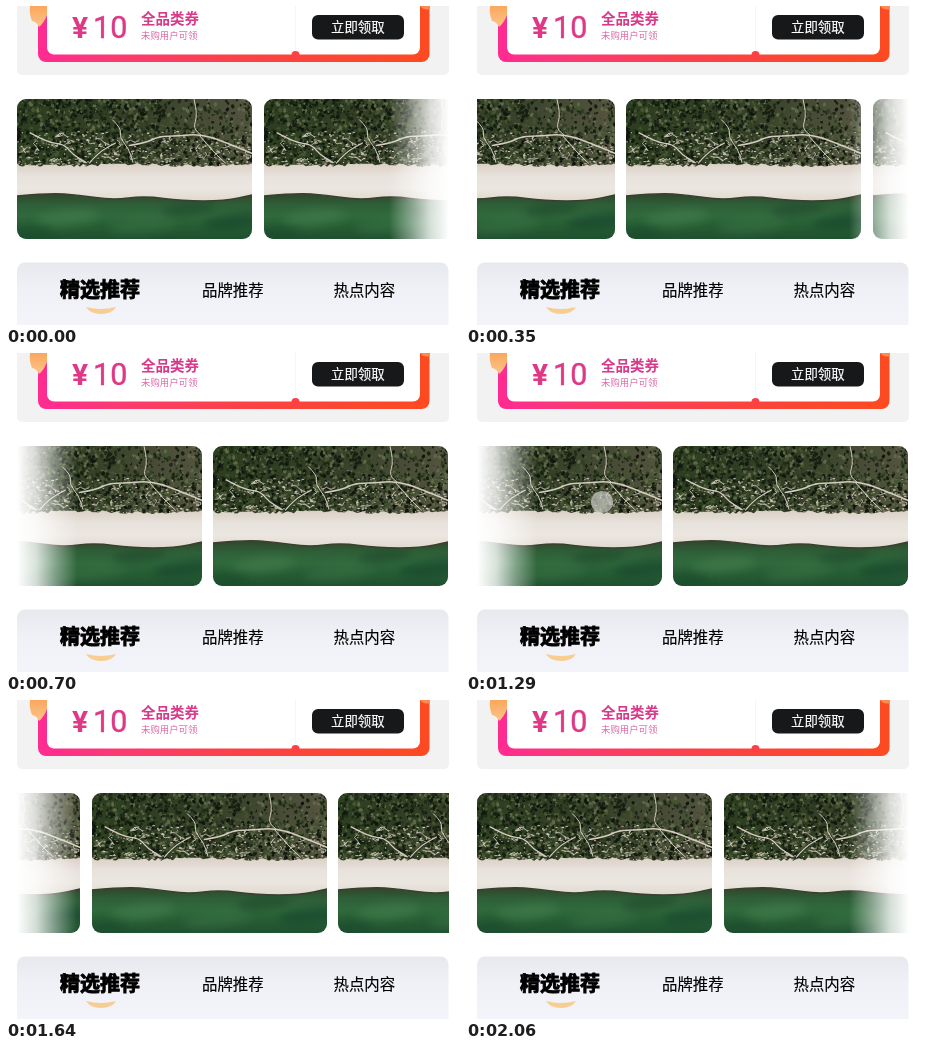
Recreate the animation shown at these times as an HTML page with a canvas. Size 454 by 319 pixels, loop 2.13 s.

```html
<!DOCTYPE html>
<html lang="zh-CN">
<head>
<meta charset="utf-8">
<style>
html, body { margin: 0; width: 100%; height: 100%; overflow: hidden; background: #fff; }
svg, .strip, .card, .fade { position: absolute; }
svg { left: 0; top: 0; }
text { font-family: "Noto Sans CJK SC", "Noto Sans CJK", sans-serif; }
.price { font-family: Roboto, sans-serif; }
.strip { left: 11px; top: 93px; width: 432px; height: 140px; overflow: hidden; }
.card { top: 0; left: 0; width: 235px; height: 140px; border-radius: 9px; }
.fade { top: 0; width: 60px; height: 140px; }
#left { left: 0; background: linear-gradient(90deg, #fff, #fffc 32%, #fff6 65%, #fff0); }
#right { right: 0; background: linear-gradient(270deg, #fff, #fffc 32%, #fff6 65%, #fff0); }
#touch { position: absolute; left: 114px; top: 45px; width: 22px; height: 22px; border-radius: 50%; background: rgba(205, 207, 200, .7); }
</style>
</head>
<body>
<svg width="454" height="319" viewBox="0 0 454 319">
  <defs>
    <linearGradient id="frame">
      <stop offset="0" stop-color="#ff2b92"/>
      <stop offset=".2" stop-color="#fb3a72"/>
      <stop offset=".5" stop-color="#fb4148"/>
      <stop offset="1" stop-color="#fd4a20"/>
    </linearGradient>
    <linearGradient id="peach" x2="0" y2="1">
      <stop offset="0" stop-color="#fba75c"/>
      <stop offset="1" stop-color="#fbc48c"/>
    </linearGradient>
    <linearGradient id="panel" x2="0" y2="1">
      <stop offset="0" stop-color="#e8e9ee"/>
      <stop offset=".35" stop-color="#f0f1f6"/>
      <stop offset="1" stop-color="#f5f6fb"/>
    </linearGradient>
  </defs>
  <rect x="11" y="-20" width="432" height="89" rx="5" fill="#f2f2f2"/>
  <rect x="32" y="-20" width="391.500" height="76" rx="8" fill="url(#frame)"/>
  <path d="M24 0H41V9Q38 17 33 21Q31 16 26 15Q23 8 24 0Z" fill="url(#peach)"/>
  <path d="M414 0H424V3Q418 5 414 0Z" fill="#ff8a4d"/>
  <rect x="41" y="-20" width="373" height="68.500" rx="7" fill="#fff"/>
  <circle cx="289.500" cy="49" r="4" fill="#fb4146"/>
  <path d="M289.500 0V44" stroke="#f9f3f6"/>
  <g fill="#df3886">
    <text class="price" x="66" y="31.500" font-size="30" font-weight="600">¥</text>
    <text class="price" x="87" y="31.500" font-size="30.500" font-weight="400" stroke="#df3886" stroke-width=".4">10</text>
    <text x="135" y="18" font-size="14.500" font-weight="700" fill="#d83a8a">全品类券</text>
    <text x="135" y="33" font-size="9.400" fill="#dd68a6">未购用户可领</text>
  </g>
  <rect x="306" y="9" width="92" height="24.500" rx="6" fill="#17181a"/>
  <text x="325" y="26" font-size="13.400" font-weight="500" fill="#fff" stroke="#fff" stroke-width=".2">立即领取</text>
  <rect x="11" y="256.500" width="431.500" height="80" rx="8" fill="url(#panel)"/>
  <path d="M80 301Q95 305 110 301Q106 308 95 308Q84 308 80 301Z" fill="#f7cd92"/>
  <g fill="#000">
    <text x="54" y="290.500" font-size="20" font-weight="900" stroke="#000" stroke-width=".9">精选推荐</text>
    <text x="196" y="289.500" font-size="15.400" stroke="#000" stroke-width=".15">品牌推荐</text>
    <text x="327.500" y="289.500" font-size="15.400" stroke="#000" stroke-width=".15">热点内容</text>
  </g>
</svg>
<div class="strip">
  <canvas class="card" width="235" height="140"></canvas>
  <canvas class="card" width="235" height="140"></canvas>
  <canvas class="card" width="235" height="140"></canvas>
  <div class="fade" id="left"></div>
  <div class="fade" id="right"></div>
  <div id="touch"></div>
</div>
<script>
const W = 235, H = 140, PITCH = 246.5, MAX = 297;
const LOOP = 2130, STEP = 70, BACK = 1290, DRAG = 490;
const $ = id => document.getElementById(id);
const cards = [...document.querySelectorAll('.card')];

function seeded(s) {
  return () => (s = (s * 16807) % 2147483647) / 2147483647;
}

function smooth(g, pts) {
  g.moveTo(...pts[0]);
  for (let i = 1; i < pts.length - 1; i++) {
    const [x, y] = pts[i], [u, v] = pts[i + 1];
    g.quadraticCurveTo(x, y, (x + u) / 2, (y + v) / 2);
  }
  g.lineTo(...pts[pts.length - 1]);
}

function gradient(g, box, ...colors) {
  const fill = g.createLinearGradient(...box);
  colors.forEach((c, i) => fill.addColorStop(i / (colors.length - 1), c));
  return fill;
}

function forest(g) {
  const rnd = seeded(71);
  g.fillStyle = gradient(g, [0, 0, W, 20], '#2c3f20', '#343f27', '#555440');
  g.fillRect(0, 0, W, 68);
  const tones = ['#10170f', '#172013', '#202c19', '#2e3f22', '#43552f', '#5f6848'];
  for (let i = 0; i < 2300; i++) {
    const x = rnd() * W, y = rnd() * 66, r = .5 + rnd() * 1.3;
    // the upper right is open heath
    if (x > 150 && y < 28 && rnd() < .6) continue;
    g.fillStyle = tones[Math.floor(rnd() * tones.length)];
    g.beginPath();
    g.ellipse(x, y, r * 1.3, r, rnd() * 3, 0, 7);
    g.fill();
  }
  // sandy clearings get denser towards the beach
  for (let i = 0; i < 330; i++) {
    const y = 66 - 34 * rnd() ** 1.4;
    g.fillStyle = rnd() < .5 ? '#a39c88' : '#cdc6b8';
    g.fillRect(rnd() * W, y, .8 + rnd() * 2.2, .6 + rnd());
  }
  g.strokeStyle = '#d3ccbf';
  g.lineCap = g.lineJoin = 'round';
  const paths = [
    [1, [178, 2], [180, 16], [177, 28], [184, 38]],
    [1, [96, 20], [103, 28], [101, 38], [111, 50], [117, 63]],
    [1.5, [111, 48], [128, 45], [142, 37], [161, 38], [182, 35], [205, 42], [235, 53]],
    [1.3, [12, 35], [30, 44], [46, 46], [57, 57], [68, 65]],
    [1.1, [72, 65], [80, 53], [98, 43]],
    [1, [182, 38], [199, 53], [209, 65]]
  ];
  for (const [w, ...pts] of paths) {
    g.lineWidth = w;
    g.beginPath();
    smooth(g, pts.map(([x, y]) => [x + rnd() * 3 - 1.5, y + rnd() * 3 - 1.5]));
    g.stroke();
  }
  // short side trails
  g.lineWidth = .8;
  for (let i = 0; i < 36; i++) {
    let x = rnd() * W, y = 36 + rnd() * 28;
    g.beginPath();
    g.moveTo(x, y);
    for (let k = 0; k < 4; k++) g.lineTo(x += rnd() * 8 - 3, y += rnd() * 6 - 3);
    g.stroke();
  }
}

function coast(g) {
  const rnd = seeded(29);
  g.fillStyle = gradient(g, [0, 64, 0, 102], '#d9cfc3', '#e8e2dc', '#ebe6e0', '#e0d9cf');
  g.beginPath();
  g.moveTo(0, H);
  for (let x = 0; x <= W + 3; x += 3) g.lineTo(x, 66 + Math.sin(x / 24) + (rnd() - .5) * 3);
  g.lineTo(W, H);
  g.fill();

  const shore = [[0, 97], [32, 94], [62, 96], [95, 101], [128, 97], [165, 102], [208, 102], [W, 96]];
  g.beginPath();
  smooth(g, shore);
  g.lineTo(W, H);
  g.lineTo(0, H);
  g.fillStyle = gradient(g, [0, 94, 0, H], '#31432a', '#2f5f38', '#306a3c', '#265c33', '#205030');
  g.fill();
  g.save();
  g.clip();
  g.filter = 'blur(4px)';
  for (const [x, y, r, c] of [[50, 119, 32, '#47805088'], [127, 126, 35, '#3c754777'], [220, 122, 34, '#17452daa'], [172, 110, 27, '#1f482c88'], [12, 136, 23, '#1b4b2d99']]) {
    g.fillStyle = c;
    g.beginPath();
    g.ellipse(x, y, r, 8, -.12, 0, 7);
    g.fill();
  }
  g.restore();
  g.strokeStyle = '#3a4030';
  g.lineWidth = 1.5;
  g.beginPath();
  smooth(g, shore);
  g.stroke();
}

const photo = cards[0].getContext('2d');
forest(photo);
coast(photo);
cards.slice(1).forEach(c => c.getContext('2d').drawImage(cards[0], 0, 0));

const clamp = v => Math.min(1, Math.max(0, v));

// time moves in 70 ms ticks, with a rest before the drag back
function tick(t) {
  return t < BACK ? Math.floor(t / STEP) * STEP : BACK + Math.floor((t - BACK) / STEP) * STEP;
}

function draw(now) {
  const t = tick(now % LOOP);
  const back = t >= BACK;
  const d = back ? t - BACK : t;
  const part = clamp(d / DRAG) ** (back ? 2.57 : 3.32);
  const offset = MAX * (back ? 1 - part : part);
  const turn = clamp((d - DRAG) / (back ? 280 : 210));
  const atEnd = back ? 1 - turn : turn;

  cards.forEach((c, i) => {
    c.style.transform = `translateX(${Math.round(i * PITCH - offset)}px)`;
  });
  $('left').style.opacity = atEnd;
  $('right').style.opacity = 1 - atEnd;
  $('touch').style.opacity = back && d < 210 ? 1 : 0;
  $('touch').style.transform = `translateX(${MAX - offset}px)`;
}

const start = performance.now();
function loop() {
  draw(performance.now() - start);
  requestAnimationFrame(loop);
}
loop();
</script>
</body>
</html>
```
